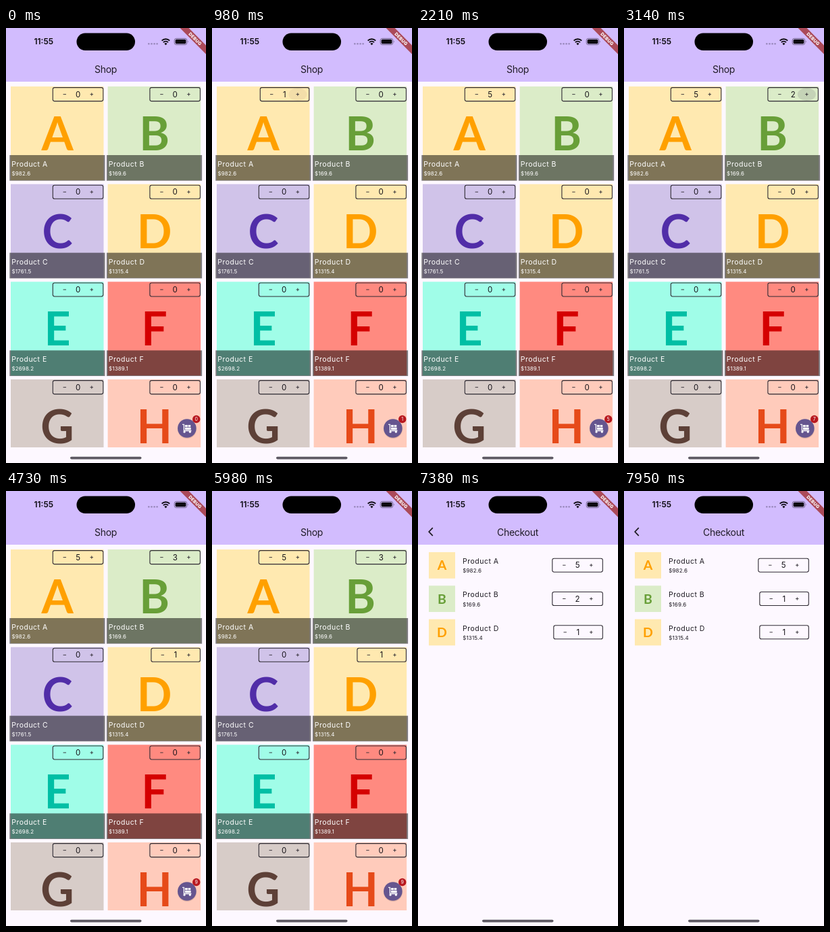
Animation of 296x640 px, one loop 8 s. Source, as an HTML page:

```html
<!DOCTYPE html>
<html lang="en">
<head>
<meta charset="utf-8">
<title>Shop</title>
<style>
  html, body { margin: 0; width: 100%; height: 100%; overflow: hidden; background: #fdf8ff; }
  svg { display: block; width: 100%; height: 100%; font-family: Inter, sans-serif; }
  .title { font-size: 14px; letter-spacing: -.3px; fill: #211d28; }
  .name { font-size: 10.5px; letter-spacing: .5px; }
  .price { font-size: 8px; letter-spacing: .15px; }
  .mid { text-anchor: middle; }
  .letter { font-family: Lato, sans-serif; font-weight: 700; text-anchor: middle; }
</style>
</head>
<body>
<svg id="stage" viewBox="0 0 296 640"></svg>
<script>
const LOOP = 8000, OPEN = 6090, SETTLED = 6200;
const BAR = '#d2bcfe', PAGE = '#fdf8ff';

const products = [
  ['A', 982.6, '#ffa000', '#ffe9b0'], ['B', 169.6, '#689f38', '#dbecc8'],
  ['C', 1761.5, '#512da8', '#d0c3e9'], ['D', 1315.4, '#ffa000', '#ffe9b0'],
  ['E', 2698.2, '#00bfa5', '#a0fde8'], ['F', 1389.1, '#d50000', '#ff8a80'],
  ['G', 0, '#5d4037', '#d7ccc8'], ['H', 0, '#e64a19', '#ffcbbb']
].map(([id, price, ink, tint]) => ({ id, price, ink, tint }));

// [time, product, change]
const taps = [
  [750, 'A', 1], [1080, 'A', 1], [1300, 'A', 1], [1540, 'A', 1], [1860, 'A', 1],
  [2820, 'B', 1], [3040, 'B', 1], [3490, 'B', 1], [4730, 'D', 1],
  [7380, 'B', -1], [7620, 'B', -1]
];

const rect = (x, y, w, h, fill, extra = '') =>
  `<rect x="${x}" y="${y}" width="${w}" height="${h}" fill="${fill}" ${extra}/>`;
const text = (x, y, str, cls, extra = '') =>
  `<text x="${x}" y="${y}" class="${cls}" ${extra}>${str}</text>`;
const group = (x, y, body) => `<g transform="translate(${x} ${y})">${body}</g>`;

const count = (id, t) =>
  taps.reduce((n, [at, key, d]) => n + (key === id && at <= t ? d : 0), 0);

function splash(id, dir, t) {
  let a = 0;
  for (const [at, key, d] of taps) {
    const age = t - at;
    if (key !== id || d !== dir || age < 95 || age >= 320) continue;
    a = Math.max(a, age < 205 ? .13 : .06);
  }
  return a;
}

function stepper(id, t) {
  const n = count(id, t), shift = n === 1 ? 1 : 0;
  const ink = (x, dir) => {
    const a = splash(id, dir, t);
    return a ? `<ellipse cx="${x}" cy="10" rx="13.5" ry="9.5" fill="#332c44" opacity="${a}"/>` : '';
  };
  const minus = 17.5 + shift * 1.4;
  return rect(shift * 2, 0, 74.5 - shift * 2, 20, 'none', 'rx="2.6" stroke="#302c34" stroke-width="1.1"') +
    ink(minus, -1) + ink(57.5, 1) +
    `<path d="M${minus - 2.2} 10h4.4M55.3 10h4.4M57.5 7.8v4.4" stroke="#302c34" stroke-width=".9"/>` +
    text(37.3 + shift * .7, 14.2, n, 'mid', 'font-size="11.5" fill="#161319"');
}

function card(p, i, t) {
  const x = 7 + (i % 2) * 143.6, y = 86 + Math.floor(i / 2) * 143.67;
  return group(x, y,
    rect(0, 0, 137.5, 138, p.tint) +
    text(69, 94, p.id, 'letter', `font-size="68" fill="${p.ink}"`) +
    rect(-1.7, 101, 141.2, 37.7, '#000', 'opacity=".5"') +
    `<g fill="#fff">${text(1.2, 118, 'Product ' + p.id, 'name')}${text(1.4, 131, '$' + p.price, 'price')}</g>` +
    group(62.3, 1.6, stepper(p.id, t)));
}

function cartButton(t) {
  const total = products.reduce((n, p) => n + count(p.id, t), 0);
  return `<circle cx="268" cy="590" r="14" fill="#000" opacity=".12"/>
    <circle cx="267.8" cy="589" r="13.8" fill="#65558f"/>
    <g fill="none" stroke="#fff" stroke-width="1.3"><path d="M261 583.3h2.4v9.2h11"/></g>
    <g fill="#fff"><path d="M265 584h3.8v3.2h-3.8zM269.6 584h3.6v3.2h-3.6zM265 588h8.6v3.2h-8.6z"/>
    <circle cx="264" cy="594.3" r="1.5"/><circle cx="272.3" cy="594.3" r="1.5"/></g>
    <circle cx="281.7" cy="575.5" r="5.7" fill="#b8181f"/>` +
    text(281.7, 578, total, 'mid', 'font-size="7" fill="#fff"');
}

const header = title => rect(0, 0, 296, 79, BAR) + text(147.5, 65.5, title, 'title mid');

const shop = t =>
  rect(0, 0, 296, 640, PAGE) +
  `<g clip-path="url(#list)">${products.map((p, i) => card(p, i, t)).join('')}</g>` +
  header('Shop') + cartButton(t);

function row(p, i, t) {
  return group(16, 90 + i * 49.3,
    rect(0, 0, 39, 38.7, p.tint) +
    text(19.5, 26.3, p.id, 'letter', `font-size="19.5" fill="${p.ink}"`) +
    `<g fill="#1d1a21">${text(50, 17, 'Product ' + p.id, 'name')}${text(50.2, 30.4, '$' + p.price, 'price')}</g>` +
    group(182.8, 9.2, stepper(p.id, t)));
}

const checkout = t =>
  rect(0, 0, 296, 640, PAGE) + header('Checkout') +
  '<path d="M21.8 54.2l-5.6 5.8 5.6 5.8" fill="none" stroke="#1d1a21" stroke-width="1.7"/>' +
  products.filter(p => count(p.id, t) > 0).map((p, i) => row(p, i, t)).join('');

const system =
  text(55.8, 24, '11:55', 'mid', 'font-size="12" font-weight="600" fill="#0d0b10"') +
  rect(104.5, 7.5, 86.5, 25.5, '#000', 'rx="12.7"') +
  [211.3, 215.5, 219.6, 223.6].map(x => `<circle cx="${x}" cy="23.3" r="1.3" fill="#9a89bd"/>`).join('') +
  `<g fill="none" stroke="#0d0b10" stroke-width="1.9">
    <path d="M230.6 18.7a8.2 8.2 0 0 1 11.6 0M232.8 21.2a5.1 5.1 0 0 1 7.2 0"/></g>
  <path d="M234.3 23a3 3 0 0 1 4.2 0l-2.1 2.2z" fill="#0d0b10"/>` +
  rect(249.2, 15.4, 18.6, 9.2, 'none', 'rx="2.8" stroke="#6f6385" stroke-width=".9"') +
  rect(250.6, 16.8, 15.8, 6.4, '#0d0b10', 'rx="1.6"') +
  '<path d="M269 18.4q1.5 1.6 0 3.2z" fill="#6f6385"/>' +
  `<g transform="translate(296 0) rotate(45)">${rect(-32, 18, 64, 9.2, '#ab4a59')}${
    text(0, 25, 'DEBUG', 'mid', 'font-size="6.6" font-weight="800" fill="#fff" letter-spacing=".2"')}</g>` +
  rect(95, 630.8, 105.5, 3.6, '#5d5963', 'rx="1.8"');

const defs = `<defs><clipPath id="list">${rect(0, 79, 296, 538, '#000')}</clipPath></defs>`;
const stage = document.getElementById('stage');
let shown = '';

function render(t) {
  let page;
  if (t < OPEN) page = shop(t);
  else if (t < SETTLED) page = group(-97, 0, shop(t)) + rect(0, 0, 296, 79, BAR) + group(5, 0, checkout(t));
  else page = checkout(t);
  const next = defs + page + system;
  if (next !== shown) stage.innerHTML = shown = next;
}

const start = performance.now();
function tick() {
  render((performance.now() - start) % LOOP);
  requestAnimationFrame(tick);
}
tick();
</script>
</body>
</html>
```
